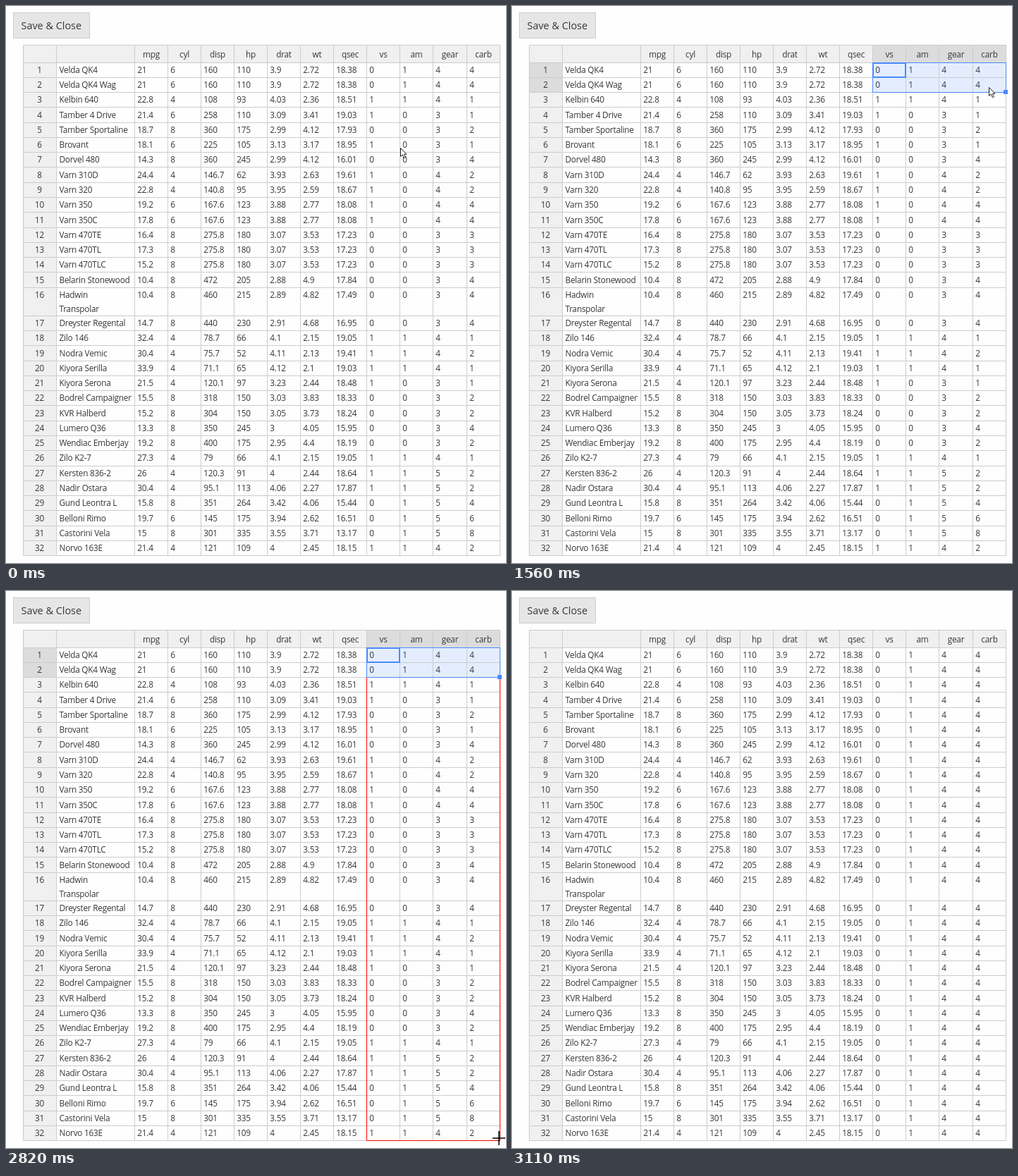
Animation of 709 by 790 pixels, one loop 3.41 s. Source, as an HTML page:

```html
<!DOCTYPE html>
<html lang="en">
<head>
<meta charset="utf-8">
<title>Editable table</title>
<style>
  html, body { margin: 0; width: 100%; height: 100%; overflow: hidden; background: #fefefe; }
  svg { display: block; width: 709px; height: 790px; }
  text { font: 11.8px "Open Sans", "Noto Sans", sans-serif; letter-spacing: -0.23px; fill: #373737; }
  .mid { text-anchor: middle; }
  .button { font-size: 14.4px; letter-spacing: 0; }
</style>
</head>
<body>
<svg id="stage" viewBox="0 0 709 790"></svg>
<script>
const HEADERS = 'mpg cyl disp hp drat wt qsec vs am gear carb'.split(' ');

// Name, mpg, disp and hp; a variant without an engine shares the one above it
const CARS = `
Velda QK4|21 160 110
Velda QK4 Wag|21
Kelbin 640|22.8 108 93
Tamber 4 Drive|21.4 258 110
Tamber Sportaline|18.7 360 175
Brovant|18.1 225 105
Dorvel 480|14.3 360 245
Varn 310D|24.4 146.7 62
Varn 320|22.8 140.8 95
Varn 350|19.2 167.6 123
Varn 350C|17.8
Varn 470TE|16.4 275.8 180
Varn 470TL|17.3
Varn 470TLC|15.2
Belarin Stonewood|10.4 472 205
Hadwin/Transpolar|10.4 460 215
Dreyster Regental|14.7 440 230
Zilo 146|32.4 78.7 66
Nodra Vemic|30.4 75.7 52
Kiyora Serilla|33.9 71.1 65
Kiyora Serona|21.5 120.1 97
Bodrel Campaigner|15.5 318 150
KVR Halberd|15.2 304 150
Lumero Q36|13.3 350 245
Wendiac Emberjay|19.2 400 175
Zilo K2-7|27.3 79 66
Kersten 836-2|26 120.3 91
Nadir Ostara|30.4 95.1 113
Gund Leontra L|15.8 351 264
Belloni Rimo|19.7 145 175
Castorini Vela|15 301 335
Norvo 163E|21.4 121 109`.trim().split('\n');

const between = (n, low, high) => n >= low && n <= high;
const trim = number => +number.toFixed(2);

function carbs(cyl, hp, am, gear) {
  if (cyl === 8) return hp > 300 ? 8 : hp > 200 ? 4 : hp === 180 ? 3 : 2;
  if (cyl === 6) return hp > 150 ? 6 : gear === 3 ? 1 : 4;
  return hp < 63 || hp > 100 || gear === 5 || (gear === 4 && !am) ? 2 : 1;
}

// The remaining columns follow from the engine and the car's place in the list
let engine;
const ROWS = CARS.map((line, i) => {
  const n = i + 1;
  const [name, figures] = line.split('|');
  const [mpg, ...own] = figures.split(' ').map(Number);
  engine = own.length ? own : engine;
  const [disp, hp] = engine;
  const cyl = disp > 260 ? 8 : disp > 150 || hp > 150 ? 6 : 4;
  const am = +(n <= 3 || between(n, 18, 20) || n >= 26);
  const gear = between(n, 27, 31) ? 5 : am || between(n, 8, 11) ? 4 : 3;
  const vs = +(cyl === 4 || (cyl === 6 && !am));
  const drat = gear === 3 ? 3.35 - 0.001 * disp : 4.3 - 0.0025 * disp;
  const wt = 1.6 + 0.007 * disp;
  const qsec = 18.83 - 0.0273 * hp + 0.94 * wt;
  const values = [mpg, cyl, disp, hp, trim(drat), trim(wt), trim(qsec), vs, am, gear, carbs(cyl, hp, am, gear)];
  return { name, values };
});

const LOOP = 3410, STEP = 60;
const CLICK = 600, DRAG_END = 1560, GRAB = 1680, FILL_START = 1860, FILL_DONE = 2950, CLEAR = 3110;
const FILL_LAG = 120;
const FIRST = 7, COLS = HEADERS.length, COUNT = ROWS.length;
const LEFT = 24.5, NAMES = 71.5, TOP = 55.5;
const BLUE = '#4b89ff', LINE = '#ccc';

// Pointer key points: time, x, y
const PATH = [
  [0, 559, 201], [180, 575, 165], [540, 533, 94], [720, 533, 94], [1080, 577, 122],
  [1140, 601, 122], [DRAG_END, 676, 115], [GRAB, 699, 122], [FILL_START, 699, 122],
  [2040, 694, 316], [2160, 691, 358], [2280, 690, 466], [2700, 699, 776]
];

const rawY = r => 80 + 21.28 * r + (r > 15 ? 18.72 : 0);
const rowY = r => Math.floor(rawY(r)) + 0.5;
const colX = c => Math.floor(182 + 47.11 * c) + 0.5;
const box = (x1, y1, x2, y2) => `M${x1} ${y1}H${x2}V${y2}H${x1}Z`;

const stage = document.getElementById('stage');
function add(tag, attrs, content = '') {
  const node = document.createElementNS('http://www.w3.org/2000/svg', tag);
  for (const key in attrs) node.setAttribute(key, attrs[key]);
  node.textContent = content;
  return stage.appendChild(node);
}
const shape = (fill, stroke = 'none', d = '', width = 1) =>
  add('path', { fill, stroke, d, 'stroke-width': width });
const label = (x, y, content, cls = '') => add('text', { x, y, class: cls }, content);
const show = (node, visible) => node.setAttribute('visibility', visible ? 'visible' : 'hidden');

const right = colX(COLS), bottom = rowY(COUNT);
shape('#e6e6e6', LINE, box(10.5, 9.5, 118.5, 45.5));
label(21.5, 32.5, 'Save & Close', 'button');

shape('#f0f0f0', 'none', box(LEFT, TOP, right, rowY(0)) + box(LEFT, TOP, NAMES, bottom));
const activeHeads = shape('#dcdcdc');

HEADERS.forEach((head, c) => label((colX(c) + colX(c + 1)) / 2, 73, head, 'mid'));
const fillCells = [];
ROWS.forEach(({ name, values }, r) => {
  const y = Math.round(rawY(r) + 14.75);
  label(47.5, y, r + 1, 'mid');
  name.split('/').forEach((part, i) => label(NAMES + 4, y + 20 * i, part));
  values.forEach((value, c) => {
    const node = label(colX(c) + 3.8, y, value);
    if (c >= FIRST) fillCells.push({ node, before: value, after: ROWS[0].values[c] });
  });
});

// The tint lies over the text but under the grid lines
const area = shape('rgba(0,94,255,.1)');
let grid = `M${LEFT} ${TOP}H${right}M${LEFT} ${TOP}V${bottom}M${NAMES} ${TOP}V${bottom}`;
for (let r = 0; r <= COUNT; r++) grid += `M${LEFT} ${rowY(r)}H${right}`;
for (let c = 0; c <= COLS; c++) grid += `M${colX(c)} ${TOP}V${bottom}`;
shape('none', LINE, grid);

const fillBorder = shape('none', '#f00');
const areaBorder = shape('none', BLUE);
const cellBorder = shape('none', BLUE, box(colX(FIRST) + 0.5, rowY(0) + 0.5, colX(FIRST + 1) - 0.5, rowY(1) - 0.5), 2);
const handle = shape(BLUE);
const arrow = shape('#fff', '#222', 'M.5 .5V12.5L3.3 10L5.4 14.7L7.4 13.8L5.3 9.3H9Z');
const cross = shape('none', '#000', 'M-9 0H9M0 -10V10', 1.6);

function pointerAt(t) {
  const next = PATH.findIndex(point => point[0] > t);
  if (next < 0) return PATH[PATH.length - 1].slice(1);
  const [t0, x0, y0] = PATH[next - 1], [t1, x1, y1] = PATH[next];
  const k = (t - t0) / (t1 - t0);
  return [x0 + (x1 - x0) * k, y0 + (y1 - y0) * k];
}

// Index of the first far edge at or beyond a position
function reach(position, edge, low, high) {
  let n = low;
  while (n < high && edge(n) < position) n++;
  return n;
}

function drawSelection(t) {
  const active = t >= CLICK && t < CLEAR;
  const filled = t >= FILL_DONE;
  const [px, py] = pointerAt(Math.min(t, DRAG_END));
  const cols = reach(px, colX, FIRST + 1, COLS);
  const rows = filled ? COUNT : reach(py, rowY, 1, 2);
  const several = cols > FIRST + 1 || rows > 1;
  const x1 = colX(FIRST), y1 = rowY(0), x2 = colX(cols), y2 = rowY(rows);

  activeHeads.setAttribute('d', box(x1, TOP, x2, y1) + box(LEFT, y1, NAMES, y2));
  for (const node of [area, areaBorder]) {
    node.setAttribute('d', box(x1, y1, x2, y2));
    show(node, active && several);
  }
  handle.setAttribute('d', box(x2 - 3.5, y2 - 3.5, x2 + 2.5, y2 + 2.5));
  [activeHeads, cellBorder, handle].forEach(node => show(node, active));

  const fillY = pointerAt(Math.max(0, t - FILL_LAG))[1];
  const lastRow = reach(fillY, rowY, 2, COUNT);
  fillBorder.setAttribute('d', box(x1, rowY(2), right, rowY(lastRow)));
  show(fillBorder, t > FILL_START && !filled && lastRow > 2);
}

function draw(time) {
  const t = time >= CLEAR ? CLEAR : Math.floor(time / STEP) * STEP;
  drawSelection(t);

  const state = t >= FILL_DONE ? 'after' : 'before';
  for (const cell of fillCells) cell.node.textContent = cell[state];

  const [x, y] = pointerAt(t).map(Math.round);
  const onHandle = between(t, GRAB, FILL_START) || t >= 2640;
  for (const node of [arrow, cross]) {
    node.setAttribute('transform', `translate(${x} ${y})`);
    show(node, t < CLEAR && onHandle === (node === cross));
  }
}

const start = performance.now();
function tick() {
  draw((performance.now() - start) % LOOP);
  requestAnimationFrame(tick);
}
draw(0);
requestAnimationFrame(tick);
</script>
</body>
</html>
```
